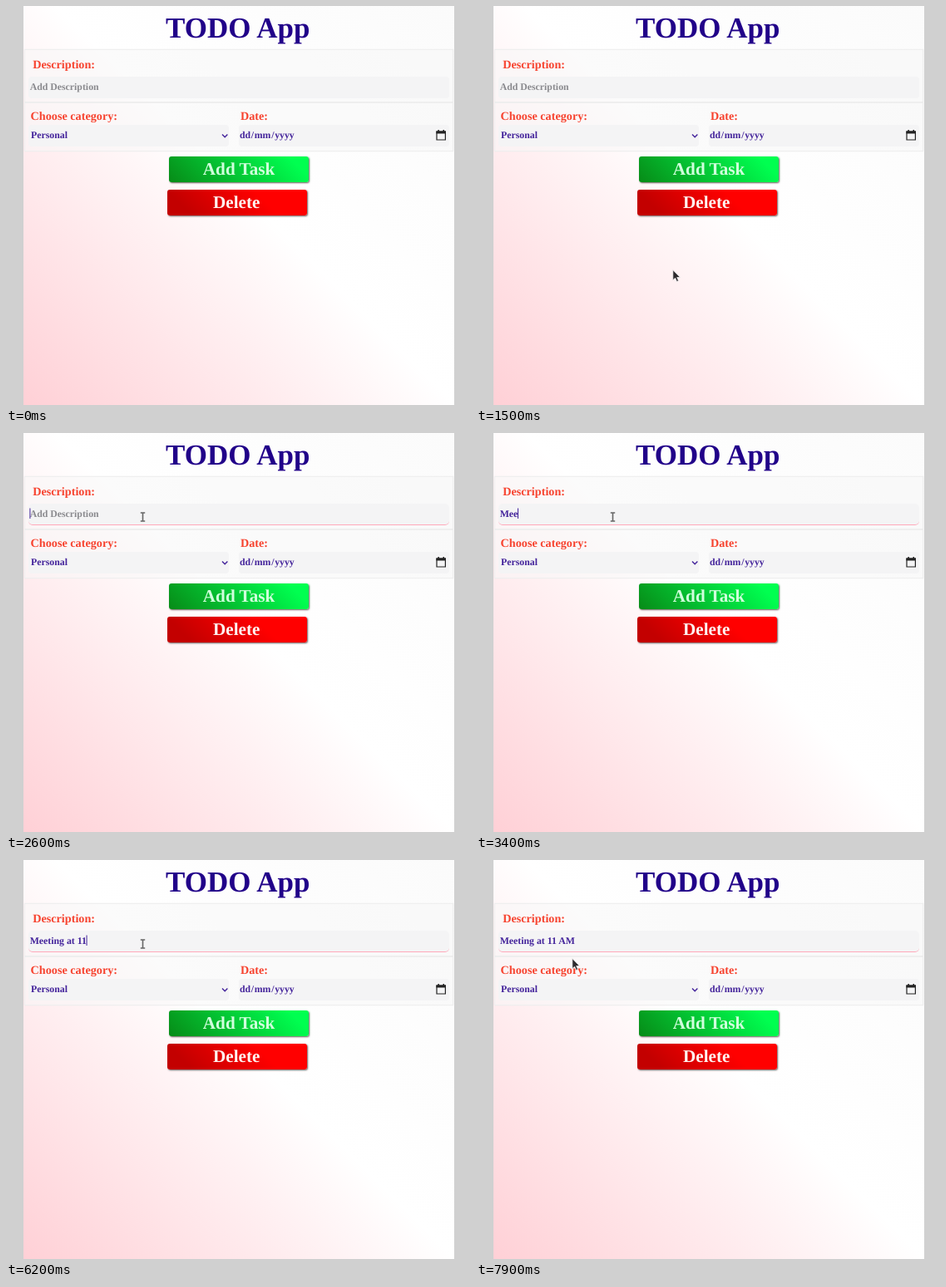
These frames come from a looping animation (558x480 px, 8000 ms). An HTML page:

```html
<!DOCTYPE html>
<html lang="en">
<head>
<meta charset="utf-8">
<title>TODO App</title>
<style>
  html, body { margin: 0; width: 100%; height: 100%; overflow: hidden; background: #d0d0d0; }
  .stage { position: relative; width: 558px; height: 480px; overflow: hidden; }
  .stage > * { position: absolute; box-sizing: border-box; }
  .page { left: 21px; top: 0; width: 518px; height: 480px;
    background: linear-gradient(45deg, #ffd0d6, #fff 52%, #fbfbfb); }
  .card { left: 22px; width: 516px; background: rgba(247, 247, 247, .55);
    border: 1px solid #efefef; box-shadow: 0 0 1px #e4e4e4; }
  .field { height: 26px; background: #f4f4f5; border-radius: 4px; }
  .focused { border-bottom: 1.4px solid #ffa9ba; border-radius: 5px; }
  .button { height: 31px; width: 168px; border-radius: 3px; box-shadow: 1px 1px 2px rgba(60, 40, 40, .75); }
  svg { left: 0; top: 0; }
  text { font: bold 11.8px "Liberation Serif", "Times New Roman", serif; fill: #44249b;
    white-space: pre; text-rendering: geometricPrecision; }
  .title { font-size: 35px; fill: #210089; }
  .label { font-size: 14.2px; fill: #f7432f; }
  .action { font-size: 21.2px; }
</style>
</head>
<body>
<div class="stage">
  <div class="page"></div>
  <div class="card" style="top:52px;height:64px"></div>
  <div class="card" style="top:116px;height:59px"></div>
  <div class="field" id="input" style="left:27px;top:85px;width:506px"></div>
  <div class="field" style="left:27px;top:143px;width:241px"></div>
  <div class="field" style="left:280px;top:143px;width:253px"></div>
  <div class="button" style="left:196px;top:181px;background:linear-gradient(45deg,#078b17,#00ff50 88%)"></div>
  <div class="button" style="left:193.5px;top:221px;background:linear-gradient(45deg,#c30000 15%,#ff0000 68%)"></div>

  <svg width="558" height="480" viewBox="0 0 558 480">
    <text class="title" x="192" y="38">TODO App</text>
    <text class="label" x="32.2" y="75">Description:</text>
    <text class="label" x="29.6" y="136.5">Choose category:</text>
    <text class="label" x="282" y="136.5">Date:</text>
    <text id="entry" x="28.7" y="100.5"></text>
    <rect id="caret" y="90.5" width="1" height="12.5" fill="#44249b"/>
    <text x="30" y="159.2">Personal</text>
    <text x="281" y="159.2">dd<tspan dx=".7">/</tspan><tspan dx=".7">mm</tspan><tspan dx=".7">/</tspan><tspan dx=".7">yyyy</tspan></text>
    <path d="M260 154.5l3.2 3.2 3.2-3.2" fill="none" stroke="#44249b" stroke-width="1.4"/>
    <path d="M518 151h10.4v10h-10.4z" fill="none" stroke="#222" stroke-width="1.2"/>
    <path d="M517.4 150.4h11.6v3h-11.6zM519.4 149h1.5v2h-1.5zM525.5 149h1.5v2h-1.5z" fill="#222"/>
    <text class="action" x="236.8" y="203" style="fill:#d0ffdc">Add Task</text>
    <text class="action" x="249" y="243" style="fill:#fff3f0">Delete</text>
    <path id="arrow" d="M0 0V12.2L2.8 9.8 4.7 14 6.8 13 4.9 9H8.8z"
      fill="#2d2a2d" stroke="#f4f4f4" stroke-width=".8"/>
    <path id="beam" d="M-2.7-5H2.7M-2.7 5H2.7M0-5V5" fill="none" stroke="#666" stroke-width="1.6"/>
  </svg>
</div>
<script>
  const DURATION = 8000, TICK = 100, FOCUS_AT = 2500;
  const MESSAGE = "Meeting at 11 AM";
  const KEY_TIMES = [3100, 3300, 3400, 3600, 3800, 3900, 4100, 4300,
    4400, 4600, 4700, 5800, 6100, 6500, 6800, 7000];
  // time, x, y
  const POINTER = [
    [1200, 287, 455], [1500, 236.8, 317.5], [1800, 193, 180], [2000, 170, 114.5],
    [2200, 164.5, 101], [7500, 164.5, 101], [7700, 146, 107], [7900, 115.8, 118.5]
  ];
  const $ = id => document.getElementById(id);
  const [input, entry, caret, arrow, beam] = ["input", "entry", "caret", "arrow", "beam"].map($);
  const show = (element, visible) => element.style.display = visible ? "" : "none";

  function pointerAt(time) {
    const next = POINTER.findIndex(point => point[0] > time);
    if (next < 0) return POINTER[POINTER.length - 1].slice(1);
    if (next === 0) return null;
    const [t0, x0, y0] = POINTER[next - 1], [t1, x1, y1] = POINTER[next];
    const k = (time - t0) / (t1 - t0);
    return [x0 + (x1 - x0) * k, y0 + (y1 - y0) * k];
  }

  function render(time) {
    const typed = KEY_TIMES.filter(key => key <= time).length;
    entry.textContent = typed ? MESSAGE.slice(0, typed) : "Add Description";
    entry.style.fill = typed ? "" : "#8a8a8e";

    const focused = time >= FOCUS_AT;
    input.classList.toggle("focused", focused);
    const lastKey = typed ? KEY_TIMES[typed - 1] : FOCUS_AT;
    show(caret, focused && (time - lastKey) % 1100 < 600);
    caret.setAttribute("x", 28.4 + (typed ? entry.getComputedTextLength() : 0));

    const position = pointerAt(time);
    const overInput = position && position[1] < 110;
    show(arrow, position && !overInput);
    show(beam, overInput);
    if (position) (overInput ? beam : arrow).setAttribute("transform", `translate(${position})`);
  }

  function frame() {
    render(Math.floor(performance.now() % DURATION / TICK) * TICK);
    requestAnimationFrame(frame);
  }
  frame();
</script>
</body>
</html>
```
